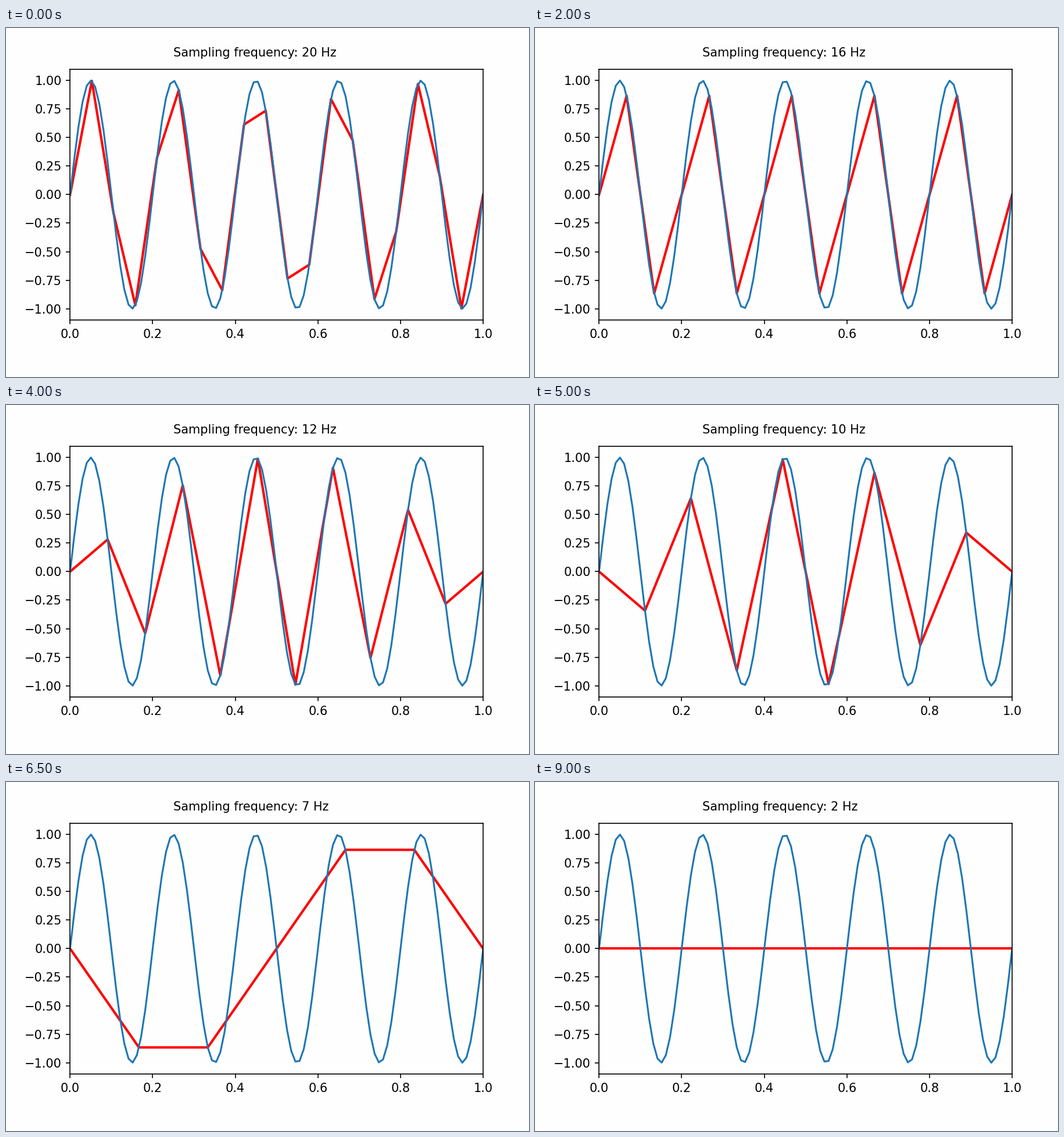
Recreate the animation shown at these times as a matplotlib script. Size 900x600 px, loop 9.5 s.

```python
import numpy as np
import matplotlib.pyplot as plt
from matplotlib.animation import FuncAnimation

W, H, DPI = 900, 600, 150
LEFT, RIGHT, TOP, BOTTOM = 110.3, 821.1, 70.7, 502.2
SIGNAL_HZ = 5
FIRST_RATE, LAST_RATE = 20, 2
BACKGROUND = "#fefefe"

plt.rcParams["font.family"] = "DejaVu Sans"


def sample(count):
    t = np.linspace(0, 1, count)
    return t, np.sin(2 * np.pi * SIGNAL_HZ * t)


fig = plt.figure(figsize=(W / DPI, H / DPI), dpi=DPI, facecolor=BACKGROUND)
ax = fig.add_axes(
    [LEFT / W, 1 - BOTTOM / H, (RIGHT - LEFT) / W, (BOTTOM - TOP) / H],
    facecolor=BACKGROUND,
)
ax.set_xlim(0, 1)
ax.set_ylim(-1.1, 1.1)

sampled, = ax.plot([], [], color="red", lw=2)
ax.plot(*sample(100), color="#1f77b4", lw=1.5)
label = ax.text(0.25, 1.05, "", transform=ax.transAxes, fontsize=10)


def update(step):
    rate = FIRST_RATE - step
    sampled.set_data(*sample(rate))
    label.set_text(f"Sampling frequency: {rate} Hz")
    return sampled, label


anim = FuncAnimation(
    fig, update, frames=FIRST_RATE - LAST_RATE + 1, interval=500, repeat=True
)
plt.show()
```
